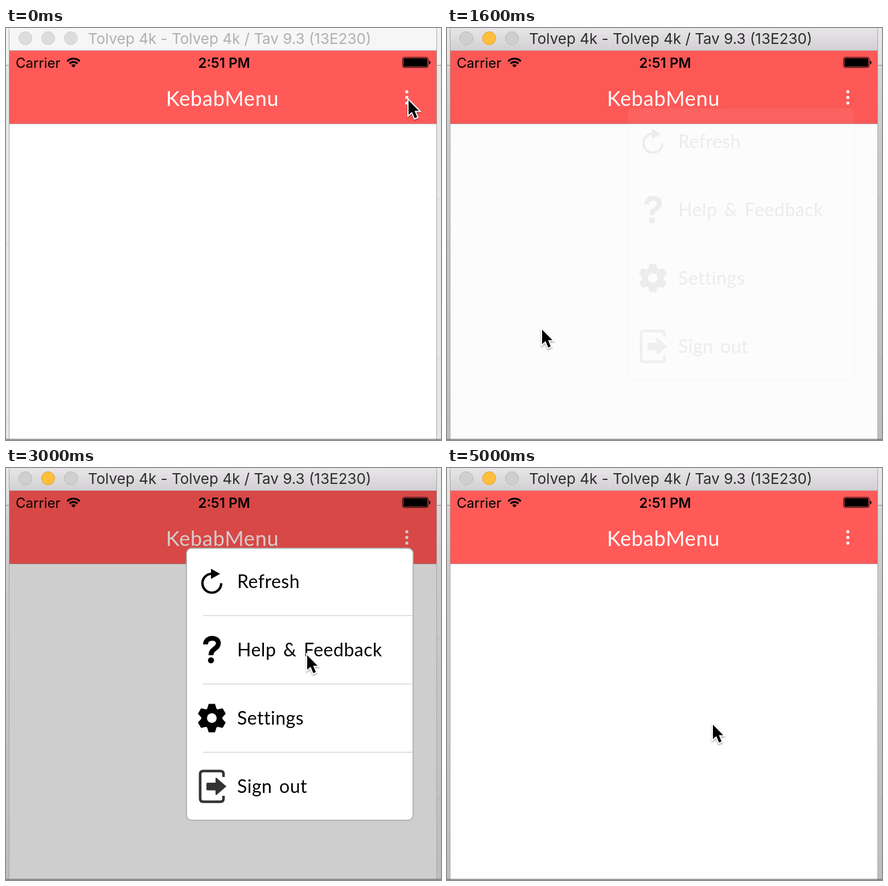
An HTML page for the animation above (5100 ms loop, 764 by 724 pixels).

```html
<!DOCTYPE html>
<html lang="en">
<head>
<meta charset="utf-8">
<title>KebabMenu</title>
<style>
  html, body { margin: 0; width: 100%; height: 100%; overflow: hidden; background: #fff; }
  svg { display: block; width: 764px; height: 724px; }
  .ui { font-family: Inter, Roboto, sans-serif; font-size: 24px; }
  .caption { font-size: 26px; fill: #b1b0b1; }
  .active .caption { fill: #2e2d2e; }
  .chrome { fill: #f6f6f6; }
  .active .chrome { fill: url(#chrome); }
  .lights { fill: #dddddd; stroke: #cfcfcf; }
  .active .lights { fill: #d0cfd0; stroke: #b9b8b9; }
  .active .minimise { fill: #ffbe3c; stroke: #e2a032; }
  .shade { opacity: 0; }
  .active .shade { opacity: 1; }
  .brand { font-family: Lato, "Open Sans", sans-serif; }
  .heading { font-size: 36px; letter-spacing: .8px; fill: #fff; }
  .label { font-size: 32px; letter-spacing: .5px; word-spacing: 4px; }
  #pointer { filter: drop-shadow(0 2px 1.5px rgba(0, 0, 0, .35)); }
</style>
</head>
<body>
<svg id="stage" viewBox="0 0 764 724">
  <defs>
    <linearGradient id="chrome" x2="0" y2="1">
      <stop stop-color="#eae8ea"/>
      <stop offset="1" stop-color="#d1cfd1"/>
    </linearGradient>
    <linearGradient id="shade" x2="0" y2="1">
      <stop stop-opacity=".04"/>
      <stop offset=".25" stop-opacity=".12"/>
      <stop offset="1" stop-opacity=".18"/>
    </linearGradient>
    <path id="tooth" d="M-9-14L-5.5-25H5.5L9-14Z"/>
  </defs>

  <!-- desktop behind the window -->
  <rect width="764" height="724" fill="#e7e7e7"/>
  <rect width="764" height="65" fill="#f1f1f1"/>
  <path d="M0 65.5H764" stroke="#8c8c8c"/>
  <path d="M0 89L6 86M0 380L6 377M0 693L6 688M756 301L764 303M756 579L764 583" stroke="#cfcfcf"/>
  <rect class="shade" width="764" height="724" fill="url(#shade)"/>

  <!-- window -->
  <rect x="5.5" y="-4.5" width="751" height="740" rx="8" fill="#fff" stroke="#a3a3a3"/>
  <path class="chrome" d="M6 40V4Q6-1 10-3H752Q756-1 756 4V40Z"/>
  <path d="M6 39.5H756" stroke="#b9b8b9"/>
  <g class="lights">
    <circle cx="34" cy="18" r="11.5"/>
    <circle class="minimise" cx="74" cy="18" r="11.5"/>
    <circle cx="114" cy="18" r="11.5"/>
  </g>
  <text class="ui caption" x="144" y="28">Tolvep 4k - Tolvep 4k / Tav 9.3 (13E230)</text>

  <!-- navigation bar -->
  <rect x="6" y="40" width="750" height="128" fill="#ff5a58"/>
  <text class="brand heading" x="281" y="137">KebabMenu</text>
  <g id="kebab" fill="#fff">
    <circle cx="704" cy="112" r="2.7"/>
    <circle cx="704" cy="122" r="2.7"/>
    <circle cx="704" cy="132" r="2.7"/>
  </g>
  <path d="M6 168.5H756" stroke="#b3a5a5"/>
  <g id="dim">
    <rect x="6" y="40" width="750" height="128" fill="#370000" opacity=".2"/>
    <rect x="6" y="168" width="750" height="556" opacity=".193"/>
  </g>

  <!-- status bar -->
  <text class="ui" x="17" y="69.5">Carrier</text>
  <text class="ui" x="383" y="69.5" text-anchor="middle" font-weight="600">2:51 PM</text>
  <g fill="none" stroke="#000" stroke-width="3.3">
    <path d="M107.5 58.5A15.6 15.6 0 0 1 129.5 58.5M111.6 62.6A9.8 9.8 0 0 1 125.4 62.6"/>
    <path d="M118.5 69.5L114.4 65.4A5.8 5.8 0 0 1 122.6 65.4Z" fill="#000" stroke="none"/>
  </g>
  <rect x="696.5" y="51.5" width="45" height="18" rx="3" fill="none" stroke="#000"/>
  <rect x="698" y="53" width="42" height="15" rx="1.5"/>
  <path d="M743 57Q745.5 58 745.5 60.5T743 64Z"/>

  <!-- menu -->
  <g id="menu">
    <rect x="317" y="141" width="398" height="478" rx="9" fill="#fff" stroke="#b0b0b0" stroke-width="1.8"/>
    <path d="M346 259.5H715M346 379.5H715M346 499.5H715" stroke="#c6c6c6"/>
    <g class="brand label">
      <text x="406" y="211">Refresh</text>
      <text x="406" y="331">Help &amp; Feedback</text>
      <text x="406" y="451">Settings</text>
      <text x="406" y="571">Sign out</text>
    </g>
    <path d="M378 202.5A16.5 16.5 0 1 1 361.5 186" fill="none" stroke="#000" stroke-width="4.2"/>
    <path d="M360 177L376 186L360 195Z"/>
    <path d="M350.5 310C350.5 296 373 296 373 308C373 318 360 317 360 329" fill="none" stroke="#000" stroke-width="8.5"/>
    <circle cx="360" cy="338" r="5.3"/>
    <g transform="translate(361.5 439.5)">
      <circle r="18.5"/>
      <use href="#tooth"/>
      <use href="#tooth" transform="rotate(60)"/>
      <use href="#tooth" transform="rotate(120)"/>
      <use href="#tooth" transform="rotate(180)"/>
      <use href="#tooth" transform="rotate(240)"/>
      <use href="#tooth" transform="rotate(300)"/>
      <circle r="8.5" fill="#fff"/>
    </g>
    <path d="M382 543V538Q382 532.5 376.5 532.5H346.5Q341 532.5 341 538V581Q341 586.5 346.5 586.5H376.5Q382 586.5 382 581V576" fill="none" stroke="#333" stroke-width="4.6"/>
    <path d="M354 553H368V546Q368 543 371 545.5L387 559.5L371 573.5Q368 576 368 573V566.5H354Q352 566.5 352 564.5V555Q352 553 354 553Z" fill="#333"/>
  </g>

  <rect y="722" width="764" height="1.5" fill="#777"/>

  <path id="pointer" d="M0 0V25.5L6 20.2L10.8 31.5L15.2 29.6L10.5 18.6H18.2Z" stroke="#fff" stroke-width="4" stroke-linejoin="miter" paint-order="stroke"/>
</svg>
<script>
  const LOOP = 5100, STEP = 100;
  const el = id => document.getElementById(id);
  const [stage, kebab, dim, menu, pointer] = ["stage", "kebab", "dim", "menu", "pointer"].map(el);

  // time, x, y of the pointer tip
  const path = [
    [0, 707, 127], [600, 705, 130], [1000, 155, 530], [1300, 155, 530],
    [1600, 167, 530], [1850, 704, 129], [2400, 703, 132], [2650, 703, 132],
    [3000, 529, 329], [3100, 529, 329], [3500, 467, 451], [LOOP, 467, 451]
  ];

  // eased 0 to 1 between two times
  function ramp(t, from, to) {
    const p = Math.min(1, Math.max(0, (t - from) / (to - from)));
    return p * p * (3 - 2 * p);
  }

  function pointerAt(t) {
    const i = path.findIndex(k => k[0] > t);
    const [t0, x0, y0] = path[i - 1], [t1, x1, y1] = path[i];
    const p = ramp(t, t0, t1);
    return [x0 + (x1 - x0) * p, y0 + (y1 - y0) * p];
  }

  function draw(t) {
    const fade = start => ramp(t, start, start + 300);
    const shown = fade(250) - fade(1345) + fade(2480) - fade(3720);
    const pressed = (t >= 200 && t < 400) || (t >= 2400 && t < 2700);

    stage.classList.toggle("active", t >= 100);
    menu.style.opacity = dim.style.opacity = shown;
    kebab.style.opacity = pressed ? .4 : 1;
    pointer.setAttribute("transform", `translate(${pointerAt(t)})`);
  }

  function tick() {
    const t = performance.now() % LOOP;
    draw(Math.floor(t / STEP) * STEP);
    requestAnimationFrame(tick);
  }
  tick();
</script>
</body>
</html>
```
